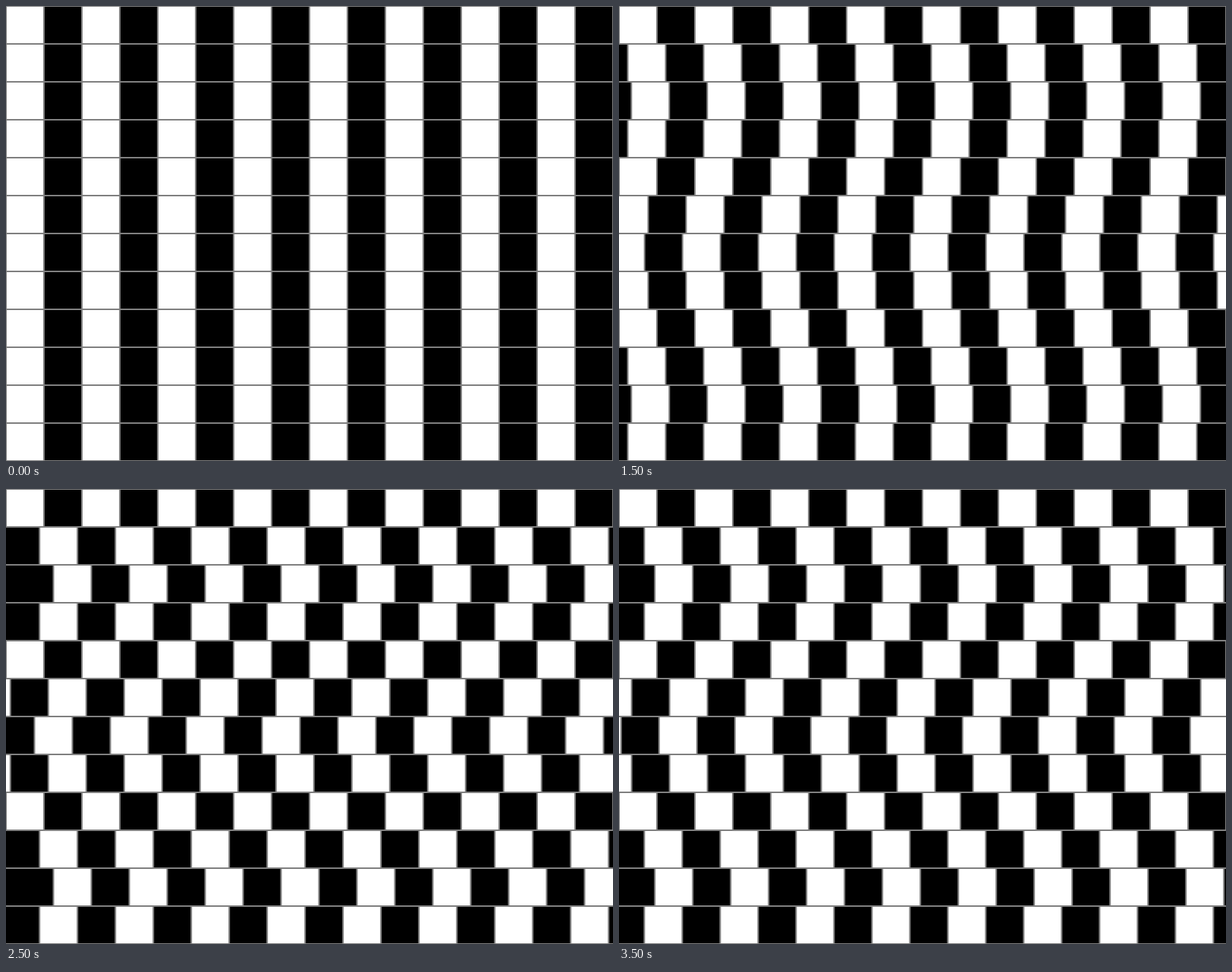
Write an HTML page with a canvas that moves like this. It is 800 px wide and 600 px high and loops after 3.75 s.

```html
<!DOCTYPE html>
<html>
<head>
<meta charset="utf-8">
<title>Sliding brick rows</title>
<style>
  html, body { margin: 0; overflow: hidden; background: #000; }
  canvas { display: block; }
</style>
</head>
<body>
<canvas id="stage" width="800" height="600"></canvas>
<script>
const ctx = document.getElementById("stage").getContext("2d");
const WIDTH = 800, HEIGHT = 600, CELL = 50, STEP = 250;

// Largest row shift in pixels, held for one step each
const shifts = [0, 26, 26, 26, 18.5, 17.7, 16.3, 39.5, 48.5, 56, 62.5, 68, 69.2, 60, 47.2];

function draw(amplitude) {
  ctx.fillStyle = "#000";
  ctx.fillRect(0, 0, WIDTH, HEIGHT);
  ctx.fillStyle = "#fff";
  ctx.strokeStyle = "#808080";
  ctx.lineWidth = 2;

  for (let row = 0; row < HEIGHT / CELL; row++) {
    const shift = amplitude * Math.sin(row * Math.PI / 4);
    for (let x = 0; x <= WIDTH; x += 2 * CELL) {
      ctx.beginPath();
      ctx.rect(x + shift, row * CELL, CELL, CELL);
      ctx.fill();
      ctx.stroke();
    }
  }

  ctx.beginPath();
  for (let y = 0; y <= HEIGHT; y += CELL) {
    ctx.moveTo(0, y);
    ctx.lineTo(WIDTH, y);
  }
  ctx.stroke();
}

function tick() {
  draw(shifts[Math.floor(performance.now() / STEP) % shifts.length]);
  requestAnimationFrame(tick);
}
tick();
</script>
</body>
</html>
```
